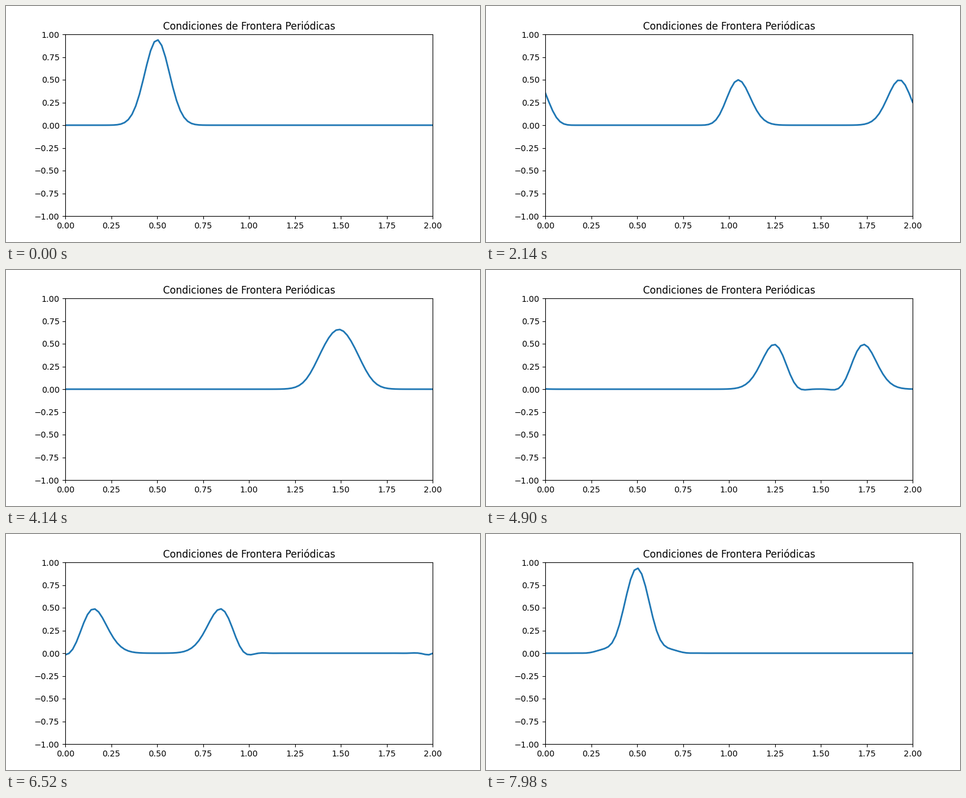
A matplotlib script for the animation above (8000 ms loop, 800 by 400 pixels).

```python
import numpy as np
import matplotlib.pyplot as plt
from matplotlib.animation import FuncAnimation

# 1D wave equation on a periodic string, explicit finite differences
LENGTH, N = 2.0, 100
SPEED, DT = 1.0, 0.005
FRAMES, INTERVAL = 400, 20
WARMUP = 4  # steps taken before the first picture

x = np.linspace(0, LENGTH, N)
r2 = (SPEED * DT / (x[1] - x[0])) ** 2


def step(prev, cur):
    new = np.empty_like(cur)
    new[1:-1] = (2 * cur[1:-1] - prev[1:-1]
                 + r2 * (cur[2:] - 2 * cur[1:-1] + cur[:-2]))
    new[0], new[-1] = new[-2], new[1]
    return cur, new


def solve():
    prev = cur = np.exp(-(x - 0.5) ** 2 / 0.008)
    history = []
    for n in range(WARMUP + FRAMES):
        prev, cur = step(prev, cur)
        history.append(cur)
    return history[WARMUP - 1:WARMUP - 1 + FRAMES]


waves = solve()

fig, ax = plt.subplots(figsize=(8, 4), dpi=100)
ax.set_xlim(0, LENGTH)
ax.set_ylim(-1, 1)
ax.set_title("Condiciones de Frontera Periódicas")
line, = ax.plot(x, waves[0], lw=2)


def update(i):
    line.set_ydata(waves[i])
    return line,


anim = FuncAnimation(fig, update, frames=FRAMES, interval=INTERVAL,
                     repeat=True, repeat_delay=0)
plt.show()
```
